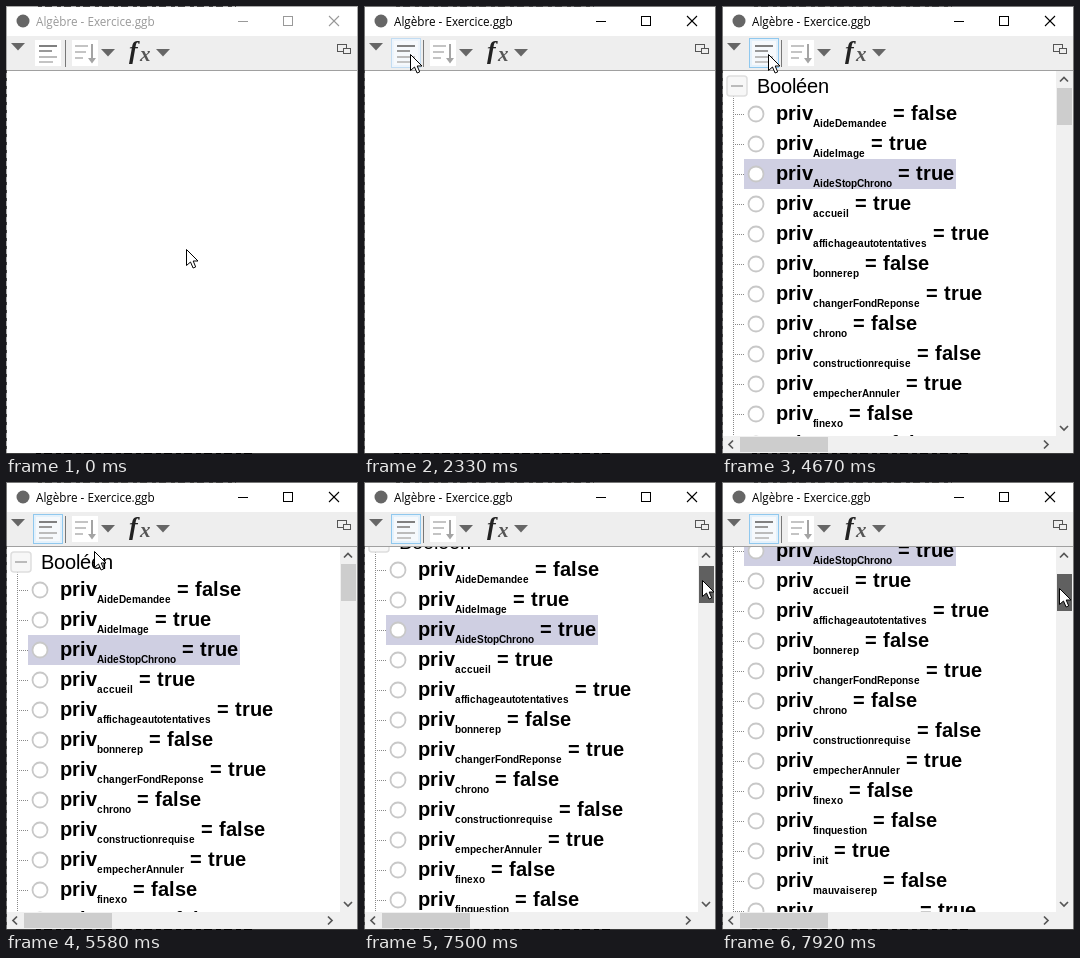
An HTML page with a canvas for the animation above (8000 ms loop, 352 px wide and 448 px high).

```html
<!DOCTYPE html>
<html lang="fr">
<head>
<meta charset="utf-8">
<title>Algèbre</title>
<style>
html, body { margin: 0; width: 352px; height: 448px; overflow: hidden; background: #fff; }
canvas { display: block; }
</style>
</head>
<body>
<canvas id="stage" width="352" height="448"></canvas>
<script>
const ctx = document.getElementById('stage').getContext('2d');
const LOOP = 8000, STEP = 1000 / 12;
const SANS = '"Liberation Sans", Arial, sans-serif';
const SERIF = '"Liberation Serif", "Times New Roman", serif';

const ROWS = [
  ['AideDemandee', false], ['AideImage', true], ['AideStopChrono', true],
  ['accueil', true], ['affichageautotentatives', true], ['bonnerep', false],
  ['changerFondReponse', true], ['chrono', false], ['constructionrequise', false],
  ['empecherAnnuler', true], ['finexo', false], ['finquestion', false],
  ['init', true], ['mauvaiserep', false], ['nombreDeTentatives', true]
];

// step numbers (12 per second)
const ACTIVE = 22, TIP_ON = 37, PRESS = 53, LIST = 56, GRAB = 86, DRAG = 90;
const DRAG_PX = [2, 5, 7, 8, 9, 10];
const SCROLL_RATIO = 9.9;

// step, x, y, easing towards this point
const PATH = [
  [9, 180, 243], [19, 91, 117, 'in'], [28, 46, 48, 'out'],
  [62, 46, 48], [72, 164, 107, 'in'], [76, 250, 93], [82, 329, 95, 'out'],
  [84, 338, 96], [DRAG, 338, 96], [95, 337, 96]
];
const EASE = {
  in: u => Math.pow(u, 1.5),
  out: u => 1 - Math.pow(1 - u, 1.6)
};

function rect(x, y, w, h, fill) {
  ctx.fillStyle = fill;
  ctx.fillRect(x, y, w, h);
}

function frame(x, y, w, h, color) {
  ctx.strokeStyle = color;
  ctx.lineWidth = 1;
  ctx.strokeRect(x + .5, y + .5, w - 1, h - 1);
}

function poly(points, fill) {
  ctx.beginPath();
  points.forEach(([x, y]) => ctx.lineTo(x, y));
  ctx.closePath();
  ctx.fillStyle = fill;
  ctx.fill();
}

function line(points, color, width = 1, dash = []) {
  ctx.beginPath();
  points.forEach(([x, y], i) => i ? ctx.lineTo(x, y) : ctx.moveTo(x, y));
  ctx.strokeStyle = color;
  ctx.lineWidth = width;
  ctx.setLineDash(dash);
  ctx.stroke();
  ctx.setLineDash([]);
}

function text(str, x, y, font, color = '#000') {
  ctx.font = font;
  ctx.fillStyle = color;
  ctx.fillText(str, x, y);
}

// glyph advances snap to whole pixels, as in hinted interface text
function label(str, x, y, font) {
  for (const ch of str) {
    text(ch, x, y, font);
    x += Math.round(ctx.measureText(ch).width);
  }
  return x;
}

function clip(x, y, w, h, draw) {
  ctx.save();
  ctx.beginPath();
  ctx.rect(x, y, w, h);
  ctx.clip();
  draw();
  ctx.restore();
}

function pointerAt(n) {
  let a = PATH[0];
  for (const b of PATH) {
    if (n < b[0]) {
      if (n <= a[0]) return [a[1], a[2]];
      const u = (n - a[0]) / (b[0] - a[0]);
      const k = b[3] ? EASE[b[3]](u) : u;
      return [Math.round(a[1] + (b[1] - a[1]) * k), Math.round(a[2] + (b[2] - a[2]) * k)];
    }
    a = b;
  }
  return [a[1], a[2]];
}

function drawPointer(x, y) {
  const shape = [[0, 0], [0, 16], [4, 12.5], [6.6, 18.5], [9.2, 17.4], [6.7, 11.5], [11.5, 11.5]]
    .map(([px, py]) => [x + .5 + px, y + .5 + py]);
  poly(shape, '#fff');
  line([...shape, shape[0]], '#000');
}

function drawBorder(active) {
  frame(0, 0, 352, 448, active ? '#777' : '#aaa');
  line([[.5, 64], [.5, 447]], '#444', 1, [3, 5]);
  line([[32, .5], [230, .5]], '#444', 1, [4, 3, 7, 5]);
  rect(0, 447, 352, 1, '#3c3c3c');
  line([[30, 447.5], [246, 447.5]], '#000', 1, [5, 3, 8, 4]);
}

function drawTitle(active) {
  const ink = active ? '#000' : '#999';
  ctx.beginPath();
  ctx.arc(17, 15, 6.5, 0, 7);
  ctx.fillStyle = '#666';
  ctx.fill();
  text('Algèbre - Exercice.ggb', 30, 19.5, '11.7px "Open Sans", "Noto Sans", sans-serif', ink);
  rect(232, 15, 10, 1, ink);
  frame(277, 10, 10, 10, ink);
  line([[323, 10], [333, 20]], ink, 1.1);
  line([[333, 10], [323, 20]], ink, 1.1);
}

function triangle(x, y) {
  poly([[x, y], [x + 14, y], [x + 7, y + 7.5]], '#666');
}

function drawToolbar(hover, selected) {
  rect(1, 30, 350, 34, '#eee');
  rect(1, 64, 350, 1, '#a0a0a0');
  triangle(5, 37);

  rect(29, 34, 26, 26, '#fff');
  if (hover || selected) {
    rect(27, 32, 30, 30, selected ? '#e4f1fb' : '#edf4fb');
    frame(27, 32, 30, 30, selected ? '#90c8ee' : '#c2dcf2');
    rect(30, 35, 24, 24, '#f6f9fc');
  }
  rect(33, 39, 18, 2, '#808080');
  rect(33, 44, 13, 2, '#999');
  rect(33, 50, 18, 2, '#bbb');
  rect(33, 55, 14, 2, '#c4c4c4');

  rect(59, 34, 1, 27, '#777');

  rect(66, 34, 26, 26, '#fff');
  [13, 11, 8].forEach((w, i) => rect(69, 39 + i * 6, w, 2, '#c4c4c4'));
  rect(85, 38, 2, 17, '#a4a4a4');
  poly([[82, 52], [90, 52], [86, 57.5]], '#a4a4a4');
  triangle(95, 43);

  text('x', 134, 55, 'italic bold 21px ' + SERIF, '#555');
  text('f', 123, 53, 'italic bold 26px ' + SERIF, '#222');
  triangle(150, 43);

  frame(331, 38, 10, 8, '#555');
  rect(337, 42, 8, 6, '#eee');
  frame(337, 42, 8, 6, '#555');
}

function drawRow([name, value], i, y) {
  if (i === 2) rect(22, y - 15, 212, 30, '#cfcfe2');
  line([[11, y + .5], [22, y + .5]], '#888', 1, [1, 1]);
  ctx.beginPath();
  ctx.arc(34, y, 7.5, 0, 7);
  ctx.fillStyle = '#fff';
  ctx.fill();
  ctx.strokeStyle = '#c8c8c8';
  ctx.lineWidth = 1.8;
  ctx.stroke();
  let x = label('priv', 54, y + 6, 'bold 20px ' + SANS);
  x = label(name, x, y + 13, 'bold 10px ' + SANS);
  label(' = ' + value, x, y + 6, 'bold 20px ' + SANS);
}

function drawList(scroll) {
  rect(1, 65, 350, 382, '#fff');
  clip(1, 65, 333, 365, () => {
    line([[11.5, 90 - scroll], [11.5, 600 - scroll]], '#888', 1, [1, 1]);
    ROWS.forEach((row, i) => drawRow(row, i, 108 + 30 * i - scroll));
    ctx.beginPath();
    ctx.roundRect(5, 70 - scroll, 20, 20, 3);
    ctx.fillStyle = '#f7f7f7';
    ctx.fill();
    ctx.strokeStyle = '#dedede';
    ctx.lineWidth = 1.5;
    ctx.stroke();
    rect(9, 79 - scroll, 12, 2, '#bbb');
    label('Booléen', 35, 87 - scroll, '20px ' + SANS);
  });
}

function chevron(x, y, dx, dy) {
  line([[x - dx * 2 - dy * 4, y - dy * 2 - dx * 4], [x + dx * 2, y + dy * 2],
    [x - dx * 2 + dy * 4, y - dy * 2 + dx * 4]], '#555', 1.7);
}

function drawScrollbars(thumb, color) {
  rect(334, 65, 17, 382, '#f0f0f0');
  rect(1, 430, 350, 17, '#f0f0f0');
  rect(335, 82 + thumb, 15, 37, color);
  rect(18, 431, 88, 15, '#cdcdcd');
  chevron(342, 73.5, 0, -1);
  chevron(342, 422, 0, 1);
  chevron(9, 438.5, -1, 0);
  chevron(324, 438.5, 1, 0);
}

function drawTip() {
  rect(46, 68, 157, 28, '#ffffe1');
  frame(46, 68, 157, 28, '#000');
  label('Objets auxiliaires', 50, 90, '20px ' + SANS);
}

function draw(t) {
  const n = Math.floor((t + 5) / STEP);
  const active = n >= ACTIVE;
  const drag = n < DRAG ? 0 : DRAG_PX[Math.min(n - DRAG, DRAG_PX.length - 1)];
  const [px, py] = pointerAt(n);
  const hover = px >= 27 && px < 57 && py >= 32 && py < 62;

  rect(0, 0, 352, 448, '#fff');
  drawTitle(active);
  drawToolbar(hover, n >= PRESS);
  if (n >= LIST) {
    drawList(Math.round(drag * SCROLL_RATIO));
    drawScrollbars(drag, n >= GRAB ? '#606060' : px >= 335 ? '#a6a6a6' : '#cdcdcd');
  }
  drawBorder(active);
  if (n >= TIP_ON && n < PRESS) drawTip();
  drawPointer(px, py + drag);
}

const start = performance.now();
function tick() {
  draw((performance.now() - start) % LOOP);
  requestAnimationFrame(tick);
}
tick();
</script>
</body>
</html>
```
